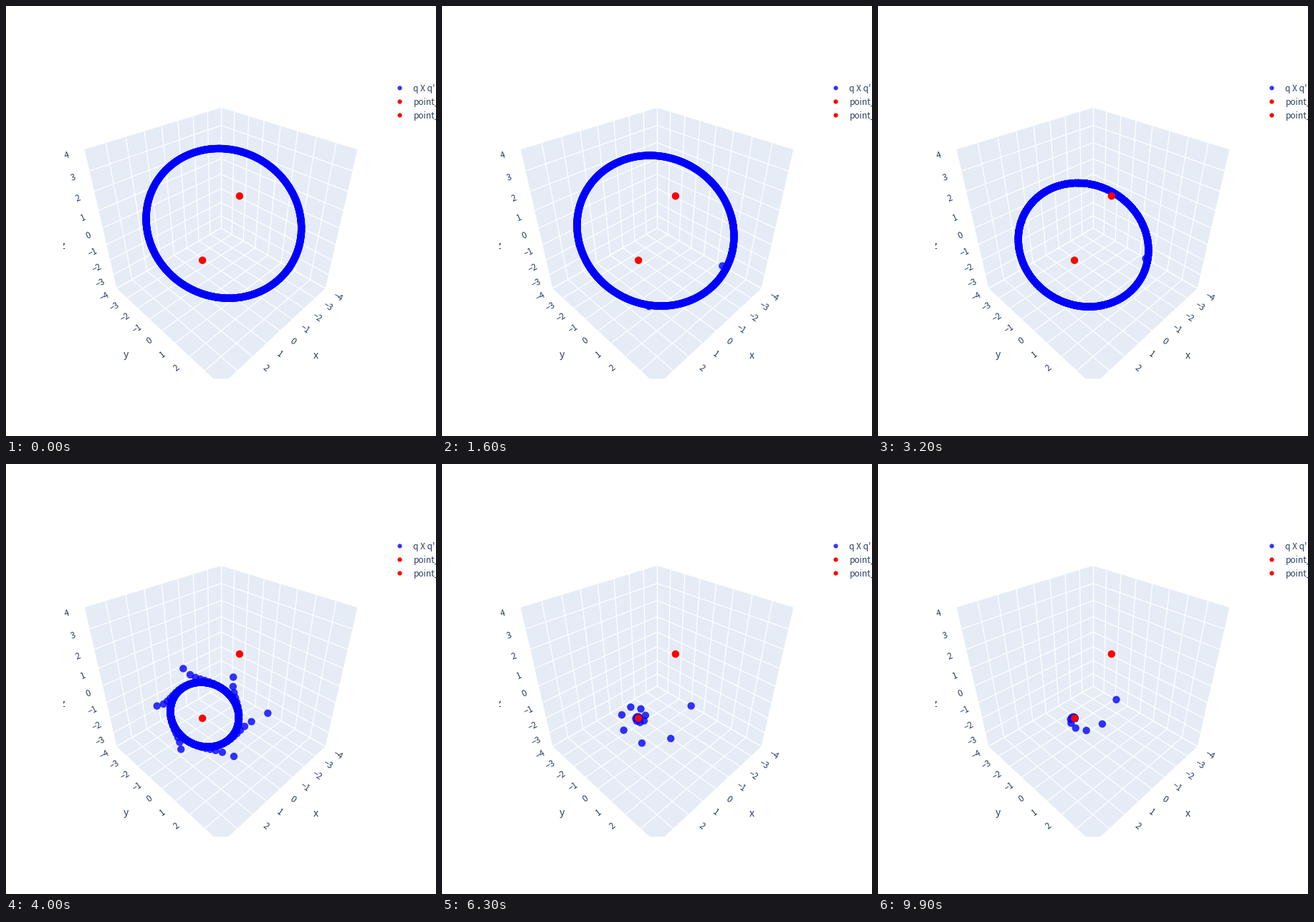
A matplotlib script that plays this animation: 600x600 px, repeating every 10000 ms.

```python
import matplotlib.pyplot as plt
import numpy as np
from matplotlib.animation import FuncAnimation
from matplotlib.patches import Polygon, Rectangle

SIZE, DPI = 600, 100
PX = 72 / DPI                       # one pixel in points
FRAMES, INTERVAL = 100, 100
STEPS = 1000                        # iterates drawn per frame
INK, WALL = "#2a3f5f", "#e5ecf6"
BLUE, RED = (0, 0, 1, 0.8), (1, 0, 0, 1)

# Camera at (1.25, 1.25, 1.25) looking at the centre of a unit cube
EYE = 1.25 * np.sqrt(3)
FOCAL = 210 / np.tan(np.radians(22.5))
BASIS = np.array([
    np.array([-1, 1, 0]) / np.sqrt(2),      # right
    np.array([-1, -1, 2]) / np.sqrt(6),     # up
    np.array([1, 1, 1]) / np.sqrt(3),       # towards the eye
])

START = np.array([1.0, 2.0, 3.0])
POLE = np.array([3.0, 2.0, 1.0])
RADIUS = np.sqrt(14)


def project(points):
    """Data coordinates (-4..4) to stage pixels and nearness."""
    right, up, near = BASIS @ np.atleast_2d(points).T / 8
    scale = FOCAL / (EYE - near)
    return np.column_stack([300 + right * scale, 310 - up * scale]), near * 8


def orbits(a):
    """Vector part of (a + X)(a + POLE), scaled back to the sphere, repeated."""
    a = a[:, None]
    x = np.tile(START, (len(a), 1))
    out = []
    for _ in range(STEPS):
        v = a * (x + POLE) + np.cross(x, POLE)
        x = v * RADIUS / np.linalg.norm(v, axis=1, keepdims=True)
        out.append(x)
    return np.stack(out, axis=1)


fig = plt.figure(figsize=(SIZE / DPI, SIZE / DPI), dpi=DPI, facecolor="white")
ax = fig.add_axes([0, 0, 1, 1])
ax.set_xlim(0, SIZE)
ax.set_ylim(SIZE, 0)
ax.axis("off")
scene = Rectangle((80, 100), 440, 420, transform=ax.transData)


def label(x, y, text, size=12, clip=True, **kw):
    t = ax.text(x, y, text, fontsize=size * PX, color=INK,
                family="Noto Sans CJK JP", zorder=3, **kw)
    if clip:
        t.set_clip_on(True)
        t.set_clip_path(scene)


def segment(p, q):
    ends, _ = project([p, q])
    line, = ax.plot(*ends.T, color="white", lw=1.3 * PX, zorder=2)
    line.set_clip_path(scene)


# Walls and grid
for i in range(3):
    j, k = [n for n in range(3) if n != i]
    corners = np.full((4, 3), -4.0)
    corners[[1, 2], j] = 4
    corners[[2, 3], k] = 4
    wall = Polygon(project(corners)[0], fc=WALL, ec="none", zorder=1)
    ax.add_patch(wall)
    wall.set_clip_path(scene)
    for m, n in ((j, k), (k, j)):
        for v in range(-4, 5):
            p = np.full(3, -4.0)
            p[m] = v
            q = p.copy()
            q[n] = 4
            segment(p, q)


def tick(v, left, right, spot):
    """Tick label beyond the wall edge, turned along its grid line."""
    (a, b, c), _ = project([left, right, spot])
    dx, dy = b - a
    label(*c, str(v).replace("-", "\u2212"),
          rotation=np.degrees(np.arctan2(-dy, dx)), rotation_mode="anchor",
          ha="center", va="center_baseline")


OUT = 4.76
for v in range(-4, 5):
    tick(v, (v, -4, -4), (v, 4, -4), (v, OUT, -4))
    tick(v, (4, v, -4), (-4, v, -4), (OUT, v, -4))
    if v > -4:
        tick(v, (4, -4, v), (-4, -4, v), (OUT, -4, v))

for x, y, name in ((432, 488, "x"), (167, 487, "y"), (79, 335, "z")):
    label(x, y, name, 14, ha="center", va="center")

# Legend
for y, color, name in ((114.3, BLUE, "q X q'"), (133.3, RED, "point_"),
                       (152.3, RED, "point_")):
    ax.scatter([548.5], [y], s=(6.2 * PX) ** 2, color=[color], lw=0)
    label(568.5, y + 4.3, name, clip=False, va="baseline")


def dots(points, color, z):
    # two equal colours keep sub-pixel positions
    return ax.scatter(*np.asarray(points).T, s=(10.4 * PX) ** 2,
                      facecolors=[color, color], linewidths=0, zorder=z)


fixed, depth = project([START, POLE])
far = dots(fixed, BLUE, 4)
dots(fixed, RED, 5)
front = dots(fixed, BLUE, 6)

paths = orbits(0.01 + 0.05 * np.arange(1, FRAMES + 1))


def update(i):
    xy, near = project(paths[i])
    over = near > depth[0] + 0.03       # nearer than the red points
    for group, mask in ((far, ~over), (front, over)):
        group.set_offsets(xy[mask])
        group.set_visible(mask.any())
    return far, front


anim = FuncAnimation(fig, update, frames=FRAMES, interval=INTERVAL,
                     repeat=True, repeat_delay=0, blit=False)
plt.show()
```
